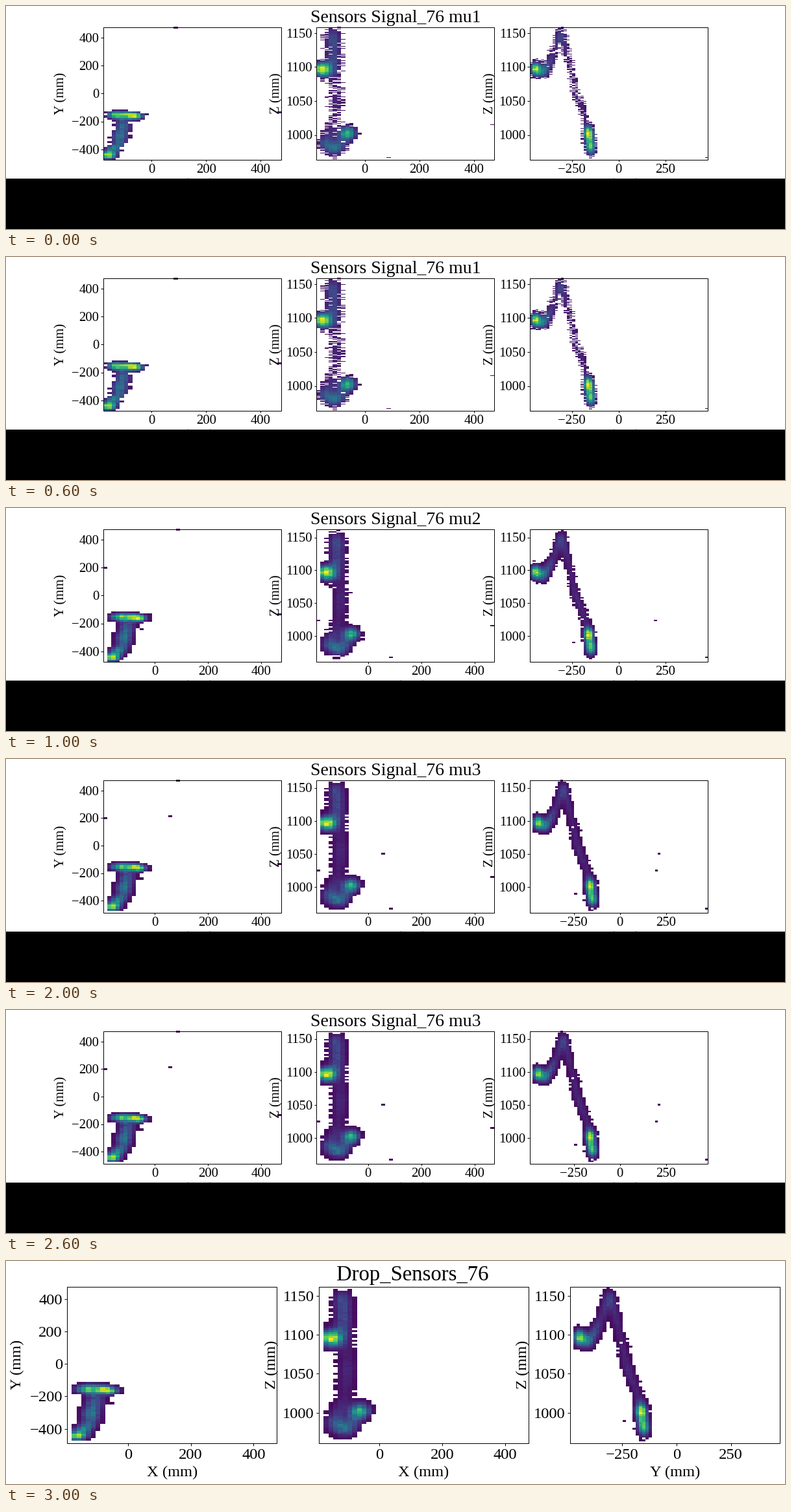
A matplotlib script that plays this animation: 1200 px wide and 345 px high, repeating every 4000 ms.

```python
import numpy as np
import matplotlib.pyplot as plt
from matplotlib.animation import FuncAnimation
from matplotlib.patches import Rectangle

W, H, DPI = 1200, 345, 100
plt.rcParams["font.family"] = "Liberation Serif"

# Particle track in mm (X, Y, Z) with the energy left per mm.
TRACK = np.array([
    (-62, -162, 1003, .009), (-105, -148, 977, .013), (-150, -152, 987, .010),
    (-118, -165, 1008, .006), (-106, -185, 1030, .004), (-102, -230, 1061, .006),
    (-108, -262, 1103, .0045), (-118, -307, 1152, .008), (-115, -352, 1115, .005),
    (-140, -400, 1091, .012), (-162, -446, 1097, .009)])
SPREAD = (19, 16, 6)
END_ENERGY = .75
STRAYS = np.array([(94, 468, 967), (468, -140, 1015), (-187, 200, 1024),
                   (-48, -247, 990), (62, 219, 1050)])
FLOOR = (-178, -475, 962)
TOP_XY = (474, 475)

# Horizontal axis, vertical axis, their tick steps, distance to the side label.
NAMES = "XYZ"
PANELS = [(0, 1, 200, 200, 71), (0, 2, 200, 50, 67), (1, 2, 250, 50, 67)]

SCENES = [
    dict(title="Sensors Signal_76 mu1", small=True, dz=1, cut=.06, noise=.65,
         low=(-177, -475), z=(963.5, 1158.5), strays=2),
    dict(title="Sensors Signal_76 mu2", small=True, dz=2, cut=.03, noise=.45,
         low=(-193, -475), z=(960.5, 1162.5), strays=4),
    dict(title="Sensors Signal_76 mu3", small=True, dz=2.5, cut=.02, noise=.45,
         low=(-193, -488), z=(961, 1161.5), strays=5),
    dict(title="Drop_Sensors_76", small=False, dz=2.5, cut=.02, noise=.45,
         low=(-193, -488), z=(961, 1161.5), strays=5),
]

# Page geometry at full size.
LEFT, PITCH, WIDTH, TOP, BOTTOM = 94.4, 387.4, 322.7, 39.9, 281.7
TEXT, TITLE = 24.5, 32.8

fig = plt.figure(figsize=(W / DPI, H / DPI), dpi=DPI, facecolor="white")
ax = fig.add_axes([0, 0, 1, 1])


def sample_track():
    """Points every 2 mm along the track and their energies."""
    points = TRACK[:, :3]
    steps = np.linalg.norm(np.diff(points, axis=0), axis=1)
    path = np.r_[0, np.cumsum(steps)]
    along = np.arange(0, path[-1], 2)
    x, y, z, energy = (np.interp(along, path, col) for col in TRACK.T)
    energy = energy * 2
    energy[[0, -1]] += END_ENERGY
    return np.array([x, y, z]), energy


POINTS, ENERGY = sample_track()


def limits(scene):
    return [*zip(scene["low"], TOP_XY), scene["z"]]


def stray_hits(scene):
    """Stray hits; the cleaned scene keeps those close to the track only."""
    hits = STRAYS[:scene["strays"]]
    if scene["small"]:
        return hits
    gaps = np.linalg.norm(hits[:, :, None] - POINTS, axis=1).min(axis=1)
    return hits[gaps < 100]


def histogram(a, b, scene):
    """Track projected on axes a and b, with empty cells masked."""
    cells, profiles = [], []
    for axis in (a, b):
        low, high = limits(scene)[axis]
        count = round((high - low) / (scene["dz"] if axis == 2 else 15))
        cell = low + (np.arange(count) + .5) * (high - low) / count
        cells.append(cell)
        profiles.append(np.exp(-((cell[:, None] - POINTS[axis]) / SPREAD[axis]) ** 2 / 2))
    u, v = cells
    signal = (profiles[1] * ENERGY) @ profiles[0].T
    signal /= signal.max()

    jitter = np.random.default_rng(7 + a + b).normal(size=signal.shape)
    lit = signal * np.exp(scene["noise"] * jitter) > scene["cut"]
    lit &= (u > FLOOR[a]) & (v > FLOOR[b])[:, None]
    for hit in stray_hits(scene):
        lit[np.abs(v - hit[b]).argmin(), np.abs(u - hit[a]).argmin()] = True
    return np.ma.masked_where(~lit, signal * np.exp(.08 * jitter))


class Page:
    """Draws in full-size page pixels, optionally shrunk onto the stage."""

    def __init__(self, small):
        self.scale, self.dx, self.dy = (.848, 69.8, -1) if small else (1, 0, 0)

    def at(self, x, y):
        return x * self.scale + self.dx, y * self.scale + self.dy

    def text(self, x, y, text, size, **kw):
        ax.text(*self.at(x, y), str(text).replace("-", "\u2212"), va="baseline",
                fontsize=size * self.scale * 72 / DPI, zorder=5, **kw)

    def line(self, x0, y0, x1, y1):
        xs, ys = zip(self.at(x0, y0), self.at(x1, y1))
        ax.plot(xs, ys, color="black", lw=.72, solid_capstyle="butt", zorder=4)


def ticks(low, high, step):
    return range(int(np.ceil(low / step)) * step, int(high), step)


def draw_panel(page, index, scene):
    a, b, step_a, step_b, gap = PANELS[index]
    left = LEFT + index * PITCH
    (u0, u1), (v0, v1) = limits(scene)[a], limits(scene)[b]
    x0, y0 = page.at(left, TOP)
    x1, y1 = page.at(left + WIDTH, BOTTOM)

    ax.imshow(histogram(a, b, scene), cmap="viridis", vmin=0, vmax=1,
              origin="lower", extent=(x0, x1, y1, y0), aspect="auto",
              interpolation="nearest", zorder=2)
    ax.add_patch(Rectangle((x0, y0), x1 - x0, y1 - y0, fill=False,
                           ec="black", lw=.72, zorder=4))

    for t in ticks(u0, u1, step_a):
        x = left + (t - u0) / (u1 - u0) * WIDTH
        page.line(x, BOTTOM, x, BOTTOM + 4)
        page.text(x, 306, t, TEXT, ha="center")
    for t in ticks(v0, v1, step_b):
        y = BOTTOM - (t - v0) / (v1 - v0) * (BOTTOM - TOP)
        page.line(left - 4, y, left, y)
        page.text(left - 7.5, y + .33 * TEXT, t, TEXT, ha="right")

    page.text(left + WIDTH / 2, 333, f"{NAMES[a]} (mm)", TEXT, ha="center")
    page.text(left - gap, (TOP + BOTTOM) / 2, f"{NAMES[b]} (mm)", TEXT,
              ha="center", rotation=90, rotation_mode="anchor")


def update(i):
    scene = SCENES[i]
    page = Page(scene["small"])
    ax.clear()
    for index in range(len(PANELS)):
        draw_panel(page, index, scene)
    page.text(626, 30.4, scene["title"], TITLE, ha="center")
    if scene["small"]:
        ax.add_patch(Rectangle((0, 267), W, H - 267, fc="black", lw=0, zorder=6))
    ax.set_xlim(0, W)
    ax.set_ylim(H, 0)
    ax.axis("off")
    return []


anim = FuncAnimation(fig, update, frames=len(SCENES), interval=1000,
                     init_func=lambda: update(0), repeat=True, repeat_delay=0)
plt.show()
```
